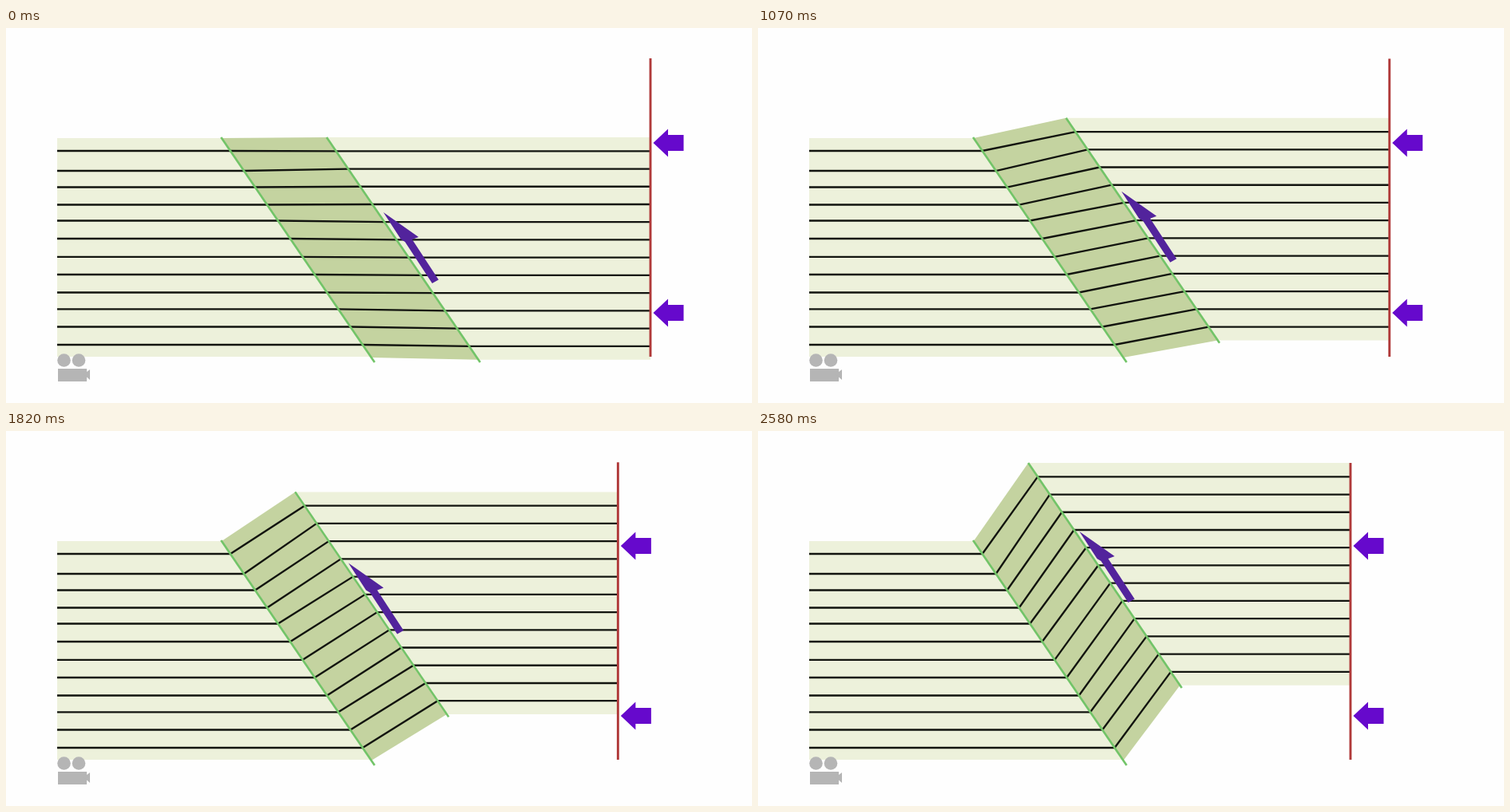
An HTML page with a canvas for the animation above (3.12 s loop, 933 by 470 pixels).

```html
<!DOCTYPE html>
<html>
<head>
<meta charset="utf-8">
<title>Reverse fault</title>
<style>
html, body { margin: 0; width: 100%; height: 100%; overflow: hidden; background: #fefefe; }
canvas { display: block; }
</style>
</head>
<body>
<canvas id="stage" width="933" height="470"></canvas>
<script>
const ctx = document.getElementById('stage').getContext('2d');
const LOOP = 3120;
// Moments at which the hanging wall advances by one step.
const STEPS = [600, 740, 810, 870, 940, 1010, 1140, 1210, 1280, 1410, 1480, 1550, 1680,
  1750, 1820, 1950, 2020, 2090, 2160, 2240, 2310, 2380, 2450, 2580];
const LAYERS = [154, 179, 199.5, 221.5, 241.5, 264, 286.8, 309, 331.5, 352.3, 374.5, 397];
const TOP = 137, SLOPE = 192 / 282;
const LIGHT = '#edf1db', DARK = '#c4d3a0', PURPLE = '#6609cc';

function trace(points, dx = 0, dy = 0) {
  ctx.beginPath();
  points.forEach(([x, y]) => ctx.lineTo(x + dx, y + dy));
}
function fill(color, points, dx, dy) {
  trace(points, dx, dy);
  ctx.fillStyle = color;
  ctx.fill();
}
function stroke(color, width, points) {
  trace(points);
  ctx.strokeStyle = color;
  ctx.lineWidth = width;
  ctx.stroke();
}
function disc(x, y, r) {
  ctx.beginPath();
  ctx.arc(x, y, r, 0, 7);
  ctx.fill();
}

function drawCamera() {
  fill('#b5b5b5', [[65, 427], [101, 427], [101, 443], [65, 443]]);
  fill('#b5b5b5', [[97, 434], [105, 428], [105, 441]]);
  disc(72.5, 416.5, 8.3);
  disc(91, 416.5, 8.3);
}

function draw(p) {
  const dx = -63 * p, dy = -97 * p, wall = 806 - 65 * p;
  const leftX = y => 269 + (y - TOP) * SLOPE;
  const rightX = y => 401 + dx + (y - dy - TOP) * SLOPE;
  const top = TOP + dy, bottom = 415.7 + dy;

  ctx.fillStyle = '#fefefe';
  ctx.fillRect(0, 0, 933, 470);
  fill(LIGHT, [[64, 138], [leftX(138), 138], [leftX(412), 412], [64, 412]]);
  fill(LIGHT, [[rightX(top), top], [wall, top], [wall, bottom], [rightX(bottom), bottom]]);
  fill(DARK, [[leftX(138), 138], [rightX(top), top], [rightX(bottom), bottom], [leftX(413), 413]]);

  LAYERS.forEach((y, i) => {
    const ry = 154.3 + 22.23 * i + dy;
    stroke('#12140f', 2.3, [[64, y], [leftX(y), y], [rightX(ry), ry], [wall, ry]]);
  });
  stroke('#72c468', 2.6, [[269, TOP], [461, 419]]);
  stroke('#72c468', 2.6, [[401 + dx, top], [593 + dx, 419 + dy]]);

  stroke('#b03a3a', 2.9, [[wall, 38 + 2 * p], [wall, 412]]);
  for (const y of [144, 357]) {
    fill(PURPLE, [[3.5, 0], [22, -17.5], [22, -10], [41.5, -10], [41.5, 10], [22, 10], [22, 17.5]], wall, y);
  }
  fill('#52239c', [[472, 231], [516, 262], [508, 265], [541, 315.5], [533, 320], [499, 268], [494, 265]],
    -70 * p, -105 * p);
  drawCamera();
}

let start;
function tick(now) {
  start ??= now;
  const t = (now - start) % LOOP;
  draw(STEPS.filter(s => s <= t).length / STEPS.length);
  requestAnimationFrame(tick);
}
draw(0);
requestAnimationFrame(tick);
</script>
</body>
</html>
```
